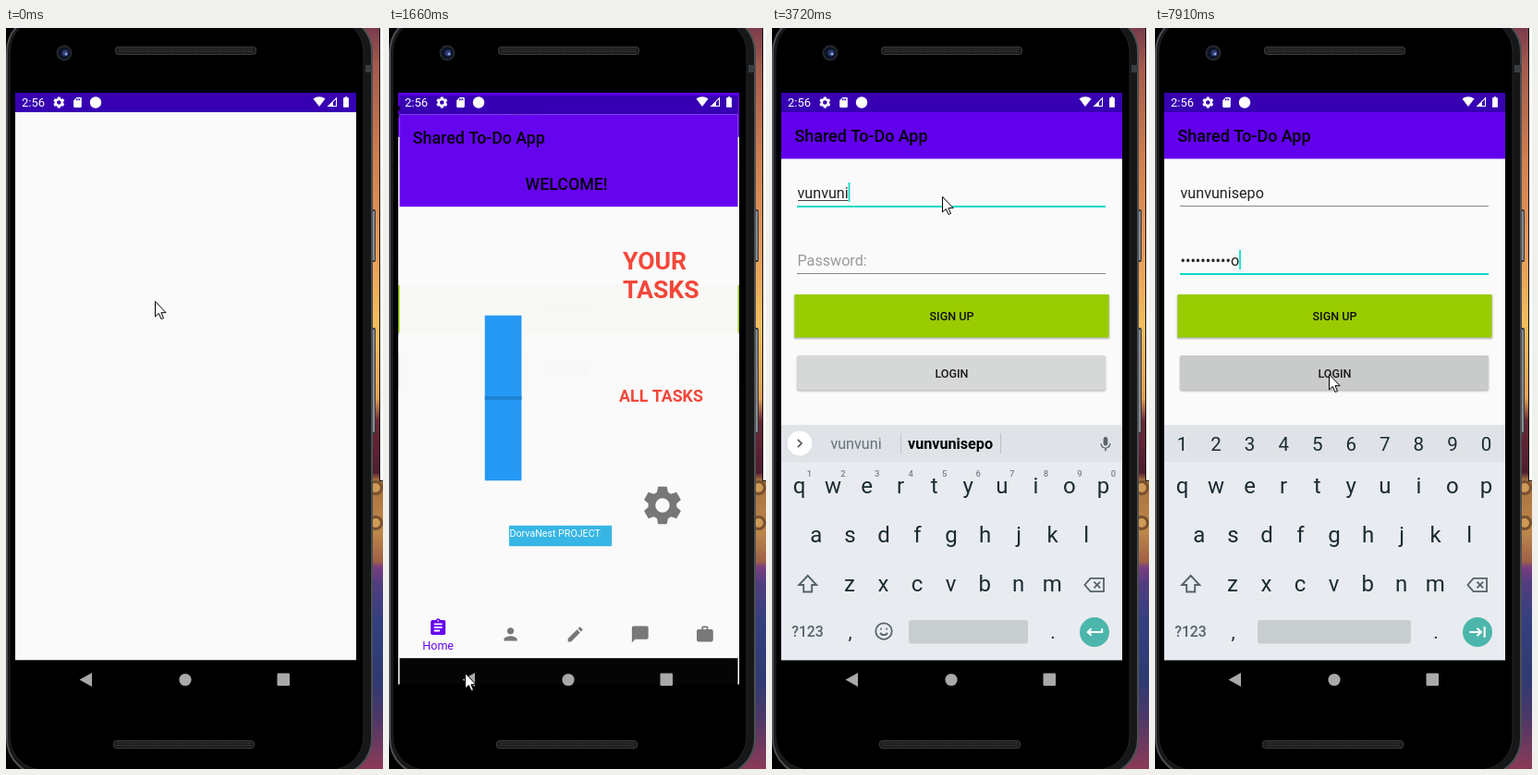
Animation of 408 by 801 pixels, one loop 8000 ms. Source, as an HTML page with a canvas:

```html
<!DOCTYPE html>
<html lang="en">
<head>
<meta charset="utf-8">
<title>Shared To-Do App</title>
<style>
html, body { margin: 0; width: 100%; height: 100%; overflow: hidden; background: #000; }
canvas { display: block; }
</style>
</head>
<body>
<canvas id="stage" width="408" height="801"></canvas>
<script>
const ctx = document.getElementById('stage').getContext('2d');
const LOOP = 8000, STEP = 138.5;
const USER = 'vunvunisepo';
const PURPLE = '#6200ee', TEAL = '#03dac5', PAPER = '#fafafa', KEY = '#1b2b33', GREY = '#757575';
const SCREEN = { x: 10, y: 70, w: 369, h: 656, cx: 194.5, cy: 398 };

// Icons on a 24 unit grid
const ICONS = {
  home: 'M19 3h-4.2a3 3 0 0 0-5.6 0H5a2 2 0 0 0-2 2v14a2 2 0 0 0 2 2h14a2 2 0 0 0 2-2V5a2 2 0 0 0-2-2zM7 7h10v2H7zM7 11h10v2H7zM7 15h7v2H7zM12 3a1 1 0 1 1 0 2a1 1 0 0 1 0-2z',
  person: 'M12 12a4 4 0 1 0 0-8a4 4 0 0 0 0 8zm0 2c-2.7 0-8 1.3-8 4v2h16v-2c0-2.7-5.3-4-8-4z',
  edit: 'M3 17.2V21h3.8L17.8 9.9l-3.7-3.7zM20.7 7a1 1 0 0 0 0-1.4l-2.3-2.3a1 1 0 0 0-1.4 0l-1.8 1.8 3.7 3.7z',
  chat: 'M20 2H4a2 2 0 0 0-2 2v18l4-4h14a2 2 0 0 0 2-2V4a2 2 0 0 0-2-2z',
  work: 'M20 6h-4V4a2 2 0 0 0-2-2h-4a2 2 0 0 0-2 2v2H4a2 2 0 0 0-2 2v11a2 2 0 0 0 2 2h16a2 2 0 0 0 2-2V8a2 2 0 0 0-2-2zm-6 0h-4V4h4z',
  card: 'M18 2h-8L4 8v12a2 2 0 0 0 2 2h12a2 2 0 0 0 2-2V4a2 2 0 0 0-2-2zM9 4h2v4H9zM12 4h2v4h-2zM15 4h2v4h-2z',
  wifi: 'M12 22L0 6.5a19 19 0 0 1 24 0z',
  signal: 'M1 22h21V1zM14 20V12l6-6v14z',
  battery: 'M16 4h-2V2h-4v2H8a1 1 0 0 0-1 1v16a1 1 0 0 0 1 1h8a1 1 0 0 0 1-1V5a1 1 0 0 0-1-1z',
  mic: 'M12 14a3 3 0 0 0 3-3V5a3 3 0 0 0-6 0v6a3 3 0 0 0 3 3zm5.3-3a5.3 5.3 0 0 1-10.6 0H5a7 7 0 0 0 6 6.7V21h2v-3.3a7 7 0 0 0 6-6.7z',
  shift: 'M12 3L21.5 13H16.5V20.5H7.5V13H2.5z',
  erase: 'M8 4.5H23V19.5H8L1.5 12zM12 8.5l7 7M19 8.5l-7 7',
  enter: 'M20.5 8v4H4.5M8.5 8l-4 4 4 4',
  next: 'M3 12h13M11.5 7.5l4.5 4.5-4.5 4.5M20 6v12',
  chevron: 'M10 7l5 5-5 5',
  smile: 'M12 2a10 10 0 1 0 0 20a10 10 0 0 0 0-20zM7.5 14a5 5 0 0 0 9 0M8.5 8.2v2M15.5 8.2v2'
};
const paths = Object.fromEntries(Object.entries(ICONS).map(([k, d]) => [k, new Path2D(d)]));
const pointer = new Path2D('M0 0V16.5L3.8 13L6.5 19L9 18L6.4 12.2H11.6Z');

const clamp = v => Math.max(0, Math.min(1, v));
const ease = (t, a, b) => { const p = clamp((t - a) / (b - a)); return p * p * (3 - 2 * p); };

function rect(x, y, w, h, color) {
  ctx.fillStyle = color;
  ctx.fillRect(x, y, w, h);
}
function pill(x, y, w, h, r, color) {
  ctx.fillStyle = color;
  ctx.beginPath();
  ctx.roundRect(x, y, w, h, r);
  ctx.fill();
}
function raised(x, y, w, h, r, color) {
  ctx.save();
  ctx.shadowColor = 'rgba(0,0,0,.3)';
  ctx.shadowBlur = 2;
  ctx.shadowOffsetY = 1;
  pill(x, y, w, h, r, color);
  ctx.restore();
}
function disc(x, y, r, color) {
  ctx.fillStyle = color;
  ctx.beginPath();
  ctx.arc(x, y, r, 0, 7);
  ctx.fill();
}
function text(s, x, y, size, color, weight = 400, align = 'left') {
  ctx.font = `${weight} ${size}px Roboto, sans-serif`;
  ctx.textAlign = align;
  ctx.fillStyle = color;
  ctx.fillText(s, x, y);
}
function icon(name, x, y, size, color, line = 0) {
  ctx.save();
  ctx.translate(x - size / 2, y - size / 2);
  ctx.scale(size / 24, size / 24);
  ctx.fillStyle = ctx.strokeStyle = color;
  ctx.lineWidth = line;
  if (line) ctx.stroke(paths[name]); else ctx.fill(paths[name], 'evenodd');
  ctx.restore();
}
function gear(x, y, r, color) {
  ctx.beginPath();
  for (let i = 0; i < 6; i++) {
    const a = i * Math.PI / 3 - Math.PI / 2;
    for (const [k, d] of [[.74, -.4], [1, -.23], [1, .23], [.74, .4]])
      ctx.lineTo(x + r * k * Math.cos(a + d), y + r * k * Math.sin(a + d));
  }
  ctx.closePath();
  ctx.moveTo(x + r * .37, y);
  ctx.arc(x, y, r * .37, 0, 7);
  ctx.fillStyle = color;
  ctx.fill('evenodd');
}

function speaker(x, y) {
  pill(x, y, 153, 9, 4, '#3b3b3b');
  pill(x + 1, y + 1, 151, 7, 3, '#1c1c1c');
  for (let i = 0; i < 73; i++)
    for (let j = 0; j < 2; j++) rect(x + 4 + i * 2, y + 2.5 + j * 2.5, 1, 1, '#484848');
}
function ring(x, y, w, h, r, fill, stroke, line) {
  pill(x, y, w, h, r, fill);
  ctx.lineWidth = line;
  ctx.strokeStyle = stroke;
  ctx.stroke();
}
function phone() {
  rect(0, 0, 408, 801, '#000');
  const sky = ctx.createLinearGradient(0, 0, 0, 801);
  [[0, '#7a3c4c'], [.05, '#a35a4c'], [.18, '#d1804f'], [.3, '#e79a58'], [.4, '#f2bd5c'], [.5, '#e2a050'],
   [.53, '#6b2936'], [.6, '#4f1d30'], [.61, '#a8703f'], [.68, '#bd8749'], [.72, '#a06048'], [.728, '#783d80'],
   [.75, '#503d80'], [.8, '#34407f'], [.88, '#2f3a72'], [.93, '#4c3868'], [1, '#8c3a56']].forEach(s => sky.addColorStop(...s));
  rect(370, 0, 38, 801, sky);
  for (const y of [497, 535]) { disc(400, y, 8, '#79502f'); disc(400, y, 5, '#cf9a55'); }
  rect(404, 0, 4, 490, '#111');
  rect(405, 0, 3, 489, '#fff');
  for (const [y, h] of [[196, 57], [324, 115]]) {
    pill(393, y, 7, h, 2, '#33373b');
    rect(396, y + 2, 3, h - 4, '#878c93');
  }
  ring(1, -14, 395, 822, 40, '#161718', '#4c4f52', 2);
  ring(4, -10, 383, 812, 36, '#000', '#242424', 1);
  rect(389, 40, 7, 8, '#3a3d40');
  speaker(118, 20);
  speaker(116, 770);
  disc(63, 27, 8.5, '#24272b');
  disc(63, 27, 6.5, '#0d1326');
  disc(64, 27, 3.5, '#2c3c70');
  disc(65, 28, 1.5, '#8fa3dc');
}

function frameBars(title) {
  rect(10, 70, 369, 21, '#3700b3');
  rect(10, 91, 369, 592.5, PAPER);
  rect(10, 683.5, 369, 43, '#000');
  if (!title) return;
  rect(10, 91, 369, 50.4, PURPLE);
  text('Shared To-Do App', 24.4, 123, 17.95, '#000', 500);
}

function homeScreen() {
  frameBars(true);
  rect(10, 140.5, 369, 51, PURPLE);
  text('WELCOME!', 192, 173.5, 17.95, '#000', 500, 'center');
  text('YOUR', 253.5, 260, 26.9, '#f44336', 700);
  text('TASKS', 253.5, 291.5, 26.9, '#f44336', 700);
  text('ALL TASKS', 249.5, 404, 17.95, '#f44336', 700);
  rect(103, 310, 40, 180, '#2196f3');
  rect(103, 398, 40, 4, '#1e83d4');
  gear(296.8, 516.9, 21, GREY);
  rect(129.5, 539, 112, 22.5, '#33b5e5');
  text('DorvaNest PROJECT', 130, 551, 10.75, '#fff');
  icon('home', 52, 650, 21.5, PURPLE);
  text('Home', 52, 674, 12.6, PURPLE, 400, 'center');
  ['person', 'edit', 'chat', 'work'].forEach((n, i) => icon(n, 131 + i * 70.7, 657.5, 21.5, GREY));
}

function field(value, hint, y, focused, caret, composing) {
  text(value || hint, 27.5, y, 16.15, value ? '#222' : '#999');
  const w = value ? ctx.measureText(value).width : 0;
  if (composing && value) rect(28, y + 2, w - 1, 1, '#444');
  if (focused) rect(27, y + 8, 334, 2, TEAL);
  else rect(27, y + 8, 334, 1, '#858585');
  if (caret) rect(27.5 + w, y - 17, 1.7, 21, TEAL);
}

function loginScreen(s) {
  frameBars(true);
  field(s.user, 'Username:', 184, !s.onPass, !s.onPass, !s.onPass);
  field(s.pass, 'Password:', 257, s.onPass, s.onPass && s.caret, false);
  raised(24.4, 288, 340.2, 46.5, 0, '#99cc00');
  text('SIGN UP', 194.5, 316, 12.56, '#111', 500, 'center');
  raised(27, 354, 334, 37.5, 2, s.pressed ? '#c9caca' : '#d6d7d7');
  text('LOGIN', 194.5, 377.5, 12.56, '#1a1a1a', 500, 'center');
}

function keyboard(s) {
  rect(10, 429, 369, 254.5, '#e8ecf0');
  rect(10, 429, 369, 40, '#dfe3e7');
  const spread = (row, x, y, size, color, weight) =>
    [...row].forEach((c, i) => text(c, x + i * 36.55, y, size, color, weight, 'center'));
  if (s.onPass) {
    spread('1234567890', 29.5, 457, 20.5, KEY);
  } else {
    disc(30, 449.5, 13.8, '#d3d7da');
    disc(30, 449, 13.5, '#fff');
    icon('chevron', 29.5, 449, 20, '#555', 2);
    rect(139, 438, 1, 22, '#bcc2c6');
    rect(247, 438, 1, 22, '#bcc2c6');
    icon('mic', 361, 450, 19, '#5c666c');
    if (s.user) {
      if (s.user.length < USER.length) text(s.user, 91, 455, 16.15, '#667279', 400, 'center');
      text(USER, 193, 455, 16.15, '#000', 700, 'center');
      if (s.user.length < 5) text('vine', 304, 455, 16.15, '#667279', 400, 'center');
    }
    spread('1234567890', 40.5, 485, 9.5, '#76828a', 500);
  }
  spread('qwertyuiop', 29.5, 503, 24, KEY);
  spread('asdfghjkl', 47.8, 556, 24, KEY);
  spread('zxcvbnm', 84, 609, 24, KEY);
  icon('shift', 38.7, 601, 24, '#56636a', 1.9);
  icon('erase', 348.5, 602, 23, '#56636a', 1.9);
  text('?123', 38.5, 658, 15.8, '#56636a', 500, 'center');
  text(',', 84.5, 660, 21, KEY, 400, 'center');
  text('.', 304, 660, 21, KEY, 400, 'center');
  const left = s.onPass ? 111 : 148;
  pill(left, 640, 277 - left, 25.5, 3, '#c8cdd0');
  if (!s.onPass) icon('smile', 121, 652, 21, '#56636a', 2);
  disc(349, 653, 16, '#4db6ac');
  icon(s.onPass ? 'next' : 'enter', 349, 653, 23, '#fff', 2.2);
}

// Paints an app window, scaled about its centre
function appWindow(paint, scale, alpha) {
  ctx.save();
  ctx.beginPath();
  ctx.rect(SCREEN.x, SCREEN.y, SCREEN.w, SCREEN.h);
  ctx.clip();
  ctx.translate(SCREEN.cx, SCREEN.cy);
  ctx.scale(scale, scale);
  ctx.translate(-SCREEN.cx, -SCREEN.cy);
  ctx.globalAlpha = alpha;
  paint();
  ctx.restore();
}

function systemIcons() {
  text('2:56', 17, 85, 13, '#fff');
  gear(57.3, 80.5, 6.2, '#fff');
  icon('card', 77.5, 80.5, 13, '#fff');
  disc(97, 80.5, 6.2, '#fff');
  icon('wifi', 339, 79.5, 13, '#fff');
  icon('signal', 353, 80, 12, '#fff');
  icon('battery', 368, 80, 14, '#fff');
  ctx.fillStyle = '#a9a9a9';
  ctx.beginPath();
  ctx.moveTo(79.5, 704.5);
  ctx.lineTo(93, 697);
  ctx.lineTo(93, 712);
  ctx.fill();
  disc(194, 704.5, 6.6, '#a9a9a9');
  pill(293.5, 697.5, 13.5, 13.5, 1, '#a9a9a9');
}

function ripple(t) {
  if (t < 1250 || t > 1500) return;
  ctx.save();
  ctx.beginPath();
  ctx.rect(10, 683.5, 369, 42.5);
  ctx.clip();
  disc(86, 704, 35, `rgba(255,255,255,${.14 * (1 - (t - 1250) / 300)})`);
  ctx.restore();
}

const trail = [[0, 161, 295], [290, 161, 295], [840, 148, 718], [1110, 82, 697], [1640, 82, 697], [2220, 184, 182],
  [6900, 184, 182], [7340, 196, 474], [7750, 188, 374], [8000, 188, 374]];
function drawPointer(t) {
  const i = trail.findIndex((p, n) => n && t <= p[0]);
  const [a, x0, y0] = trail[i - 1], [b, x1, y1] = trail[i];
  const p = ease(t, a, b);
  ctx.save();
  ctx.translate(Math.round(x0 + (x1 - x0) * p) + .5, Math.round(y0 + (y1 - y0) * p) + .5);
  ctx.fillStyle = '#fff';
  ctx.strokeStyle = '#000';
  ctx.lineWidth = 1;
  ctx.fill(pointer);
  ctx.stroke(pointer);
  ctx.restore();
}

// Each pair: time, number of typed letters
const userKeys = [[2915, 1], [3055, 3], [3360, 4], [3480, 5], [3600, 6], [3720, 7], [3850, 8], [3980, 10], [4110, 11]];
const passKeys = [[5070, 1], [5220, 2], [5370, 3], [5520, 5], [5670, 6], [5950, 7], [6230, 8], [6370, 10], [6500, 11]];
const typed = (keys, t) => keys.reduce((n, [at, count]) => t >= at ? count : n, 0);

function draw(t) {
  const snap = t < 150 ? 0 : 150 + Math.floor((t - 150) / STEP) * STEP;
  const hidden = typed(passKeys, t);
  const state = {
    user: USER.slice(0, typed(userKeys, t)),
    pass: hidden ? '•'.repeat(hidden - 1) + USER[hidden - 1] : '',
    onPass: t >= 4390,
    caret: !(t >= 4790 && t < 5070 || t >= 6970 && t < 7470),
    pressed: t >= 7905
  };
  phone();
  if (t < 150) {
    appWindow(() => frameBars(false), 1, 1);
  } else {
    const p = ease(snap, 1500, 1700);
    const fade = 1 - clamp((snap - 1534) / 50);
    if (snap > 1500) appWindow(() => loginScreen(state), 1.1 - .1 * p, 1);
    if (fade > 0) appWindow(homeScreen, 1 - .1 * p, fade);
  }
  const rise = ease(snap, 2550, 2770);
  if (rise > 0) {
    ctx.save();
    ctx.beginPath();
    ctx.rect(10, 429, 369, 254.5);
    ctx.clip();
    ctx.translate(0, 254 * (1 - rise));
    keyboard(state);
    ctx.restore();
  }
  ripple(snap);
  systemIcons();
  drawPointer(snap);
}

const start = performance.now();
function tick() {
  draw((performance.now() - start) % LOOP);
  requestAnimationFrame(tick);
}
tick();
</script>
</body>
</html>
```
